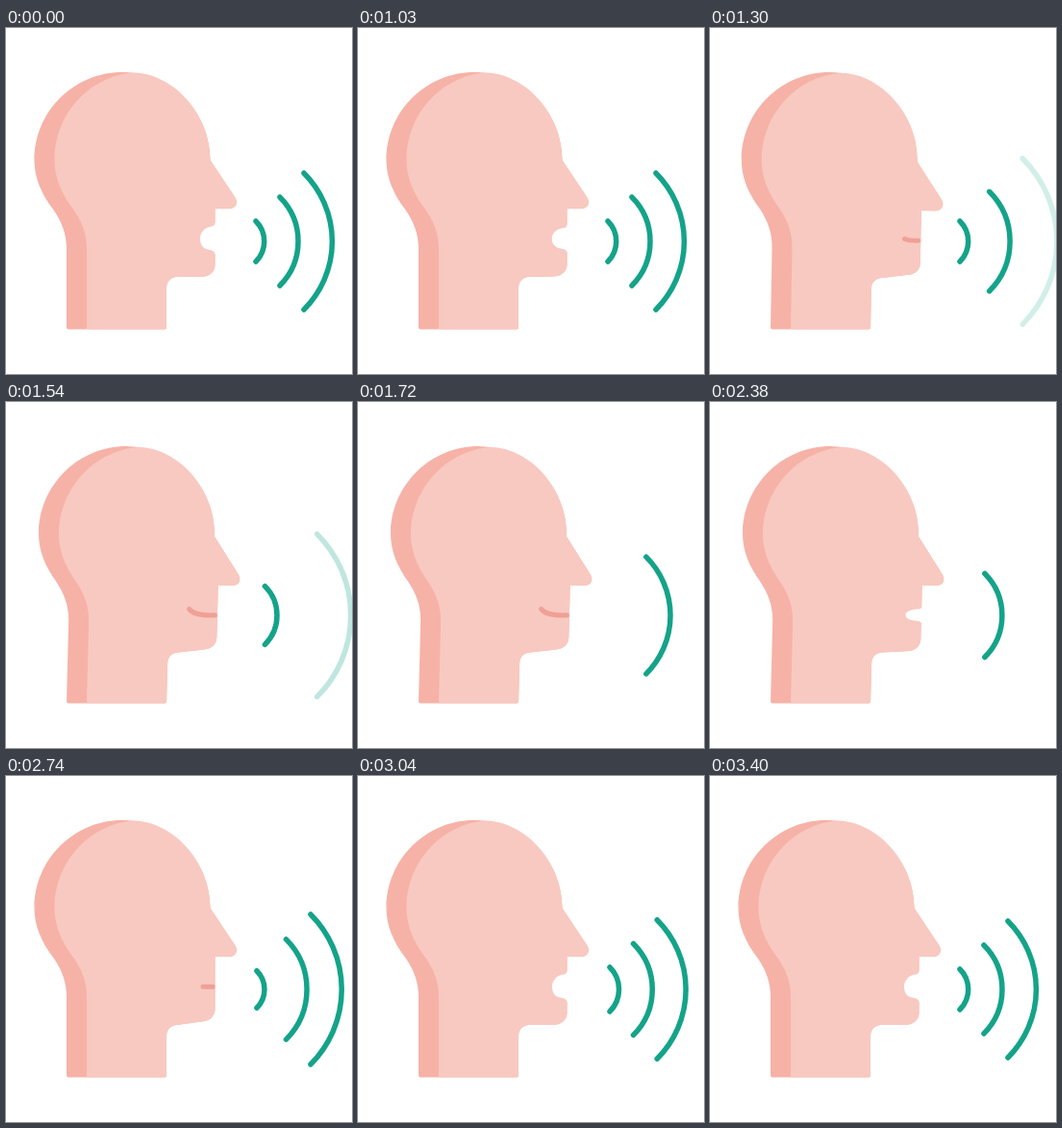
Recreate the animation shown at these times as an HTML page. Size 360x360 px, loop 3430 ms.

```html
<!DOCTYPE html>
<html lang="en">
<head>
<meta charset="utf-8">
<title>Talking head</title>
<style>
  html, body { margin: 0; width: 100%; height: 100%; overflow: hidden; background: #fff; }
  svg { display: block; width: 100vw; height: 100vh; }
  .line { fill: none; stroke-linecap: round; }
</style>
</head>
<body>
<svg viewBox="0 0 360 360">
  <path id="back" fill="#f6b2a7"/>
  <path id="face" fill="#f8c9c1"/>
  <path id="gap" fill="#fff"/>
  <path id="lips" class="line" stroke="#f0a096" stroke-width="5"/>
  <g id="waves" class="line" stroke="#14a389" stroke-width="5.5">
    <path/><path/><path/>
  </g>
</svg>
<script>
const LOOP = 3430, HOLD = 1030, STEP = 30;
const $ = id => document.getElementById(id);
const arcs = [...$('waves').children];

const mix = (a, b, p) => a + (b - a) * p;
const part = (t, a, b) => Math.min(1, Math.max(0, (t - a) / (b - a)));
const inOut = p => (1 - Math.cos(Math.PI * p)) / 2;
const easeOut = p => Math.sin(Math.PI * p / 2);

// Value of a list of [time, value] keys, eased between neighbours
function track(t, keys) {
  let v = keys[0][1];
  for (let i = 1; i < keys.length; i++) {
    const [a] = keys[i - 1], [b, next] = keys[i];
    if (t >= a) v = mix(keys[i - 1][1], next, inOut(part(t, a, b)));
  }
  return v;
}

const TILT = [[1030, 0], [1450, 1], [1700, 1], [1960, .9], [2200, 1], [2400, 1], [2640, 0]];
const OPEN = [[950, 1], [1300, 0], [2260, 0], [2500, 1], [2680, 0], [2750, 0], [3000, 1]];
const SMILE = [[1200, 0], [1500, 1], [2140, 1], [2280, 0]];

// rest radius, peak radius, exit start/end, entry start/peak/settled
const WAVES = [
  { rest: 100.4, peak: 111, out: [1030, 1330], into: [2240, 2650, 3180] },
  { rest: 65, peak: 74, out: [1150, 1565], into: [2400, 2760, 3180] },
  { rest: 29.7, peak: 36, out: [1370, 1830], into: [2620, 2880, 3180] }
];
const FAR = 127, NEAR = 10;

function wave(w, t) {
  const [start, top, end] = w.into;
  if (t < w.out[1]) {
    const p = part(t, ...w.out);
    const r = mix(w.rest, FAR, p * p);
    return { x: 239, r, alpha: Math.min(1, (FAR - r) / (FAR - 100.4)) };
  }
  if (t < start) return { x: 239, r: NEAR, alpha: 0 };
  const p = part(t, start, top);
  const r = p < 1 ? mix(NEAR, w.peak, easeOut(p)) : mix(w.peak, w.rest, inOut(part(t, top, end)));
  return { x: 239 + 5 * (1 - p), r, alpha: 1 };
}

// Lean every point of a path forward over the fixed base of the neck
function bend(d, angle) {
  return d.replace(/([\d.]+),([\d.]+)/g, (_, sx, sy) => {
    const x = +sx, y = +sy, up = 313.5 - y;
    const nx = x + angle * up;
    const ny = y + angle * (x - 115) * Math.min(1, Math.max(0, up / 60));
    return nx.toFixed(2) + ',' + ny.toFixed(2);
  });
}

// Forehead, nose, chin and front of the neck; the chin rises as the mouth shuts
function profile(shut) {
  return `C171.5,46 212.5,87 212.5,137.5 L237.5,175
    C242.5,182 239,188 232,188 L217.5,188 L217.5,${246 - 4 * shut}
    C217.5,${254 - 3 * shut} 211,${259 - 4 * shut} 203,${259 - 3.5 * shut}
    L178,259 C171,259.5 167,264 167,271 L167,311.5 Q167,313.5 165,313.5`;
}

function mouth(open) {
  const y = 219.3, top = y - 14.5 * open, low = y + 14 * open;
  const left = mix(200, 202, open);
  return `M219,${top - 2 * open} L217.5,${top - 2 * open}
    Q217.5,${top + 1.5 * open} 213,${top + 2 * open}
    C206,${top + 3 * open} ${left},${y - 6 * open} ${left},${y}
    C${left},${y + 6 * open} 205,${low - 3 * open} 211,${low - 2.5 * open}
    Q217,${low - 2 * open} 217.5,${low + 2 * open} L219,${low + 2 * open} Z`;
}

function lips(s) {
  const y = 219.3;
  return `M${mix(205, 188, s)},${mix(y, 213.5, s)}
    C${mix(208, 193, s)},${mix(y, 219.5, s)} ${mix(212, 203, s)},${mix(y, 220, s)} 215,${y}`;
}

function draw(t) {
  const angle = .0256 * track(t, TILT);
  const open = track(t, OPEN);
  const set = (id, d) => $(id).setAttribute('d', bend(d, angle));
  const front = profile(1 - open);

  set('back', `M65,313.5 Q63,313.5 63,311.5 L63,230 C63,214 58,202 50,190
    C36,172 29.5,155 29.5,137.5 C29.5,87 70.5,46 121,46 ${front} Z`);
  set('face', `M84,313.5 L84,230 C84,214 79,202 71,190
    C57,172 50.5,155 50.5,137.5 C50.5,90 86,51 131,46.5 ${front} Z`);
  set('gap', mouth(open));
  set('lips', lips(track(t, SMILE)));
  $('gap').style.display = open > .06 ? '' : 'none';
  $('lips').style.display = open > .06 ? 'none' : '';

  WAVES.forEach((w, i) => {
    const { x, r, alpha } = wave(w, t), k = r * Math.SQRT1_2;
    arcs[i].setAttribute('d', `M${x + k},${222 - k} A${r},${r} 0 0 1 ${x + k},${222 + k}`);
    arcs[i].setAttribute('opacity', alpha);
  });
}

const begin = performance.now();
function tick(now) {
  const t = Math.max(0, now - begin) % LOOP;
  draw(t < HOLD ? 0 : HOLD + STEP * Math.floor((t - HOLD) / STEP));
  requestAnimationFrame(tick);
}
draw(0);
requestAnimationFrame(tick);
</script>
</body>
</html>
```
